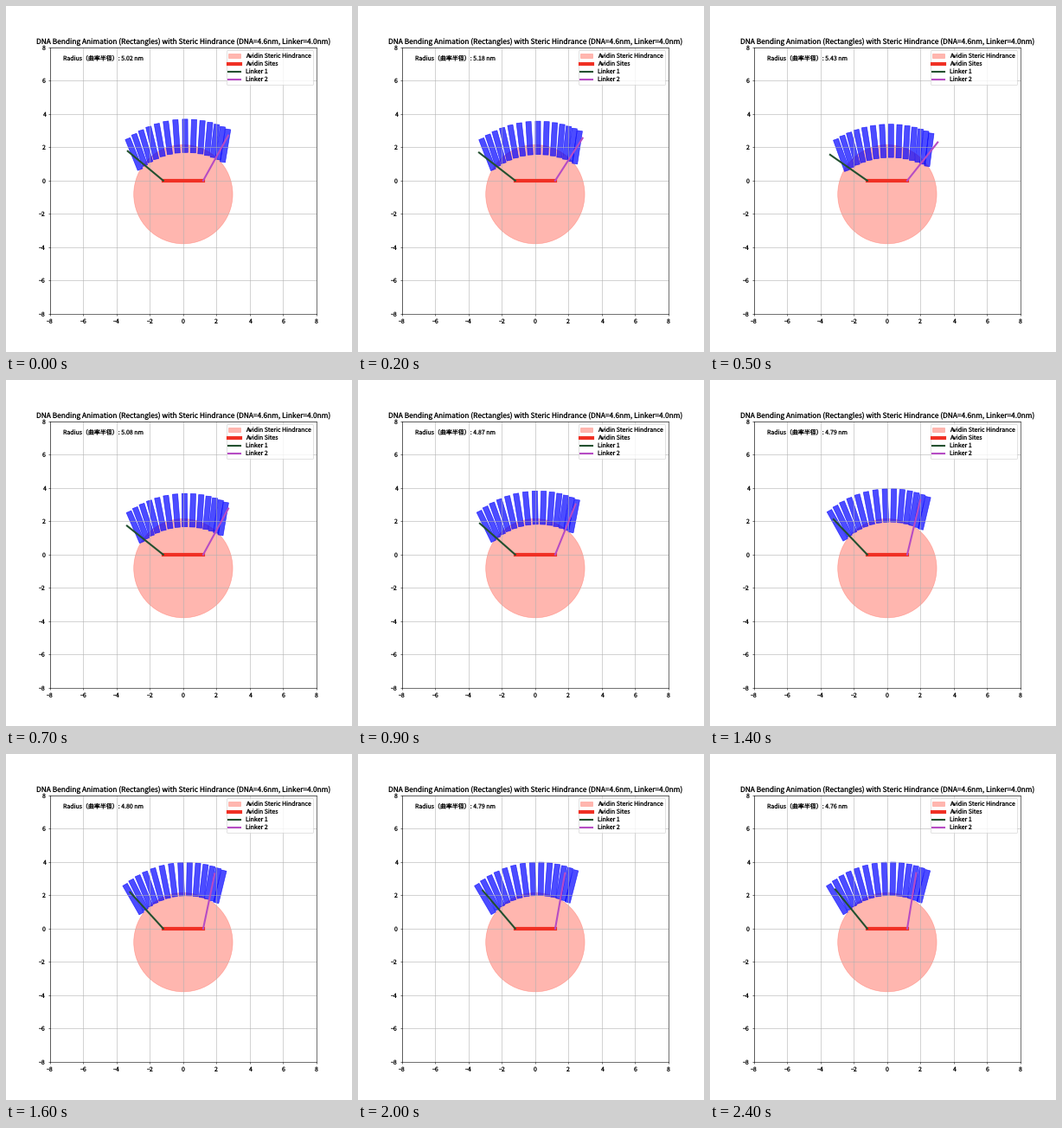
A matplotlib script that plays this animation: 400 px wide and 400 px high, repeating every 2.5 s.

```python
import numpy as np
import matplotlib.pyplot as plt
from matplotlib.animation import FuncAnimation
from matplotlib.patches import Circle, Polygon

FRAMES, INTERVAL = 25, 100
PEAK = 5                       # frame of strongest compression
DNA, LINKER, DIAMETER = 4.6, 4.0, 2.0
COUNT, WIDTH = 14, 0.32
SITE = 1.2                     # half distance between the binding sites
CENTER_X = 0.17

plt.rcParams["font.family"] = ["Noto Sans CJK JP"]
plt.rcParams["text.hinting"] = "none"


def relax(k, start, peak, end, tau):
    """Ease from start to peak, then decay exponentially towards end."""
    if k <= PEAK:
        return start + (peak - start) * k / PEAK
    return end + (peak - end) * np.exp(-(k - PEAK) / tau)


def radius(k):
    return np.interp(k, [0, 5, 7, 9, 12, 16, 20, 24],
                     [5.02, 5.43, 5.08, 4.87, 4.78, 4.80, 4.79, 4.76])


def base_pairs(k):
    """Corners of the rectangles along the bent arc."""
    r = radius(k)
    apex = relax(k, 2.69, 2.39, 2.995, 3.2)
    left = -np.arcsin(relax(k, 3.13, 2.92, 3.18, 3.2) / r)
    right = np.arcsin(relax(k, 2.36, 2.35, 2.0, 5) / r)
    tilt_left = np.radians(relax(k, 22, 19.8, 31, 5))
    tilt_right = np.radians(relax(k, 9.5, 7.5, 15, 6))

    # spacing is widest at the apex and tightest at the right end
    u = np.linspace(0, 1, COUNT)
    u = u - 0.17 * np.sin(2 * np.pi * u) / (2 * np.pi) + 0.1 * u * (1 - u)
    theta = left + (right - left) * u
    tilt = np.where(theta < 0, tilt_left * theta / -left,
                    tilt_right * theta / right)
    w, h = WIDTH / 2, DIAMETER / 2
    box = np.array([[-w, -h], [w, -h], [w, h], [-w, h]])
    for t, a in zip(theta, tilt):
        c, s = np.cos(a), np.sin(a)
        middle = [CENTER_X + r * np.sin(t), apex - r * (1 - np.cos(t))]
        yield box @ np.array([[c, -s], [s, c]]) + middle


def linker(side, angle, length):
    a = np.radians(angle)
    return ([side * SITE, side * (SITE + length * np.cos(a))],
            [0, length * np.sin(a)])


fig, ax = plt.subplots(figsize=(8, 8), dpi=50)
# a hair off the half pixel, so grid lines snap up and left
fig.subplots_adjust(left=0.1247, right=0.8997, bottom=0.1103, top=0.8803)
ax.set(xlim=(-8, 8), ylim=(-8, 8), aspect="equal")
ax.set_xticks(range(-8, 9, 2))
ax.set_yticks(range(-8, 9, 2))
ax.grid(True)
ax.set_title("DNA Bending Animation (Rectangles) with Steric Hindrance "
             f"(DNA={DNA}nm, Linker={LINKER}nm)")

ax.add_patch(Circle((0, -0.82), 2.97, color="#ff6f61", alpha=0.5,
                    label="Avidin Steric Hindrance"))
rects = [ax.add_patch(Polygon(np.zeros((4, 2)), color="blue", alpha=0.7))
         for _ in range(COUNT)]
ax.plot([-SITE, SITE], [0, 0], color="#f03024", lw=6, label="Avidin Sites")
link1, = ax.plot([], [], color="#22502f", lw=3, label="Linker 1")
link2, = ax.plot([], [], color="#b64cc4", lw=3, label="Linker 2")
label = ax.text(0.05, 0.95, "", transform=ax.transAxes)
ax.legend(loc="upper right", labelspacing=0.23)


def update(k):
    for rect, corners in zip(rects, base_pairs(k)):
        rect.set_xy(corners)
    link1.set_data(*linker(-1, relax(k, 39.7, 34.9, 53, 9),
                           relax(k, 2.77, 2.72, 3.12, 12)))
    link2.set_data(*linker(1, relax(k, 61, 51.5, 81.5, 5),
                           relax(k, 3.1, 2.94, 3.38, 3)))
    label.set_text(f"Radius（曲率半径）: {radius(k):.2f} nm")
    return [*rects, link1, link2, label]


anim = FuncAnimation(fig, update, frames=FRAMES, interval=INTERVAL,
                     repeat=True, repeat_delay=0)
plt.show()
```
